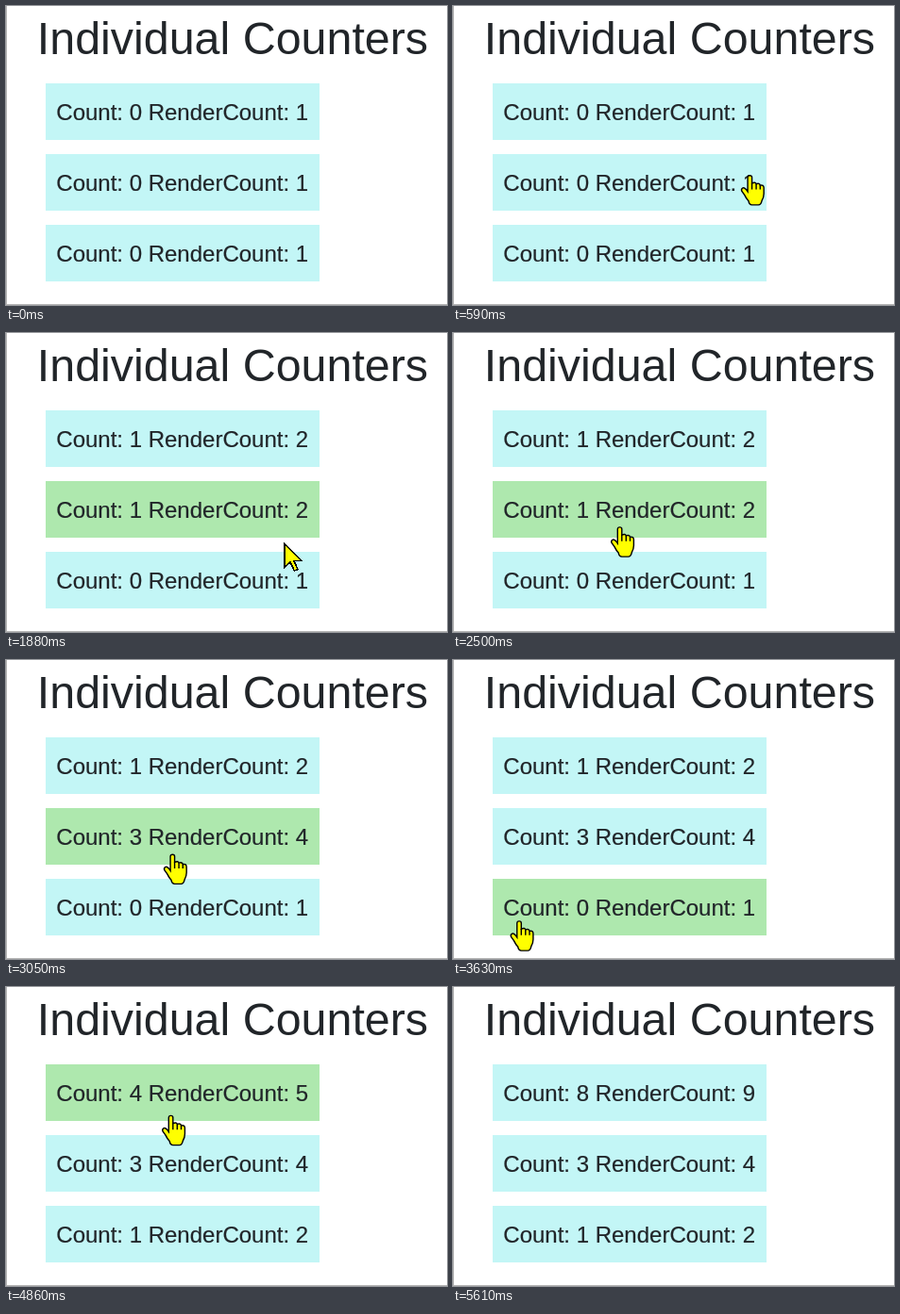
These frames come from a looping animation (467x317 px, 6.24 s). An HTML page:

```html
<!DOCTYPE html>
<html lang="en">
<head>
<meta charset="utf-8">
<title>Individual Counters</title>
<style>
  html, body { margin: 0; width: 100%; height: 100%; overflow: hidden; background: #fff; }
  svg { display: block; width: 467px; height: 317px; }
  text { font-family: "Liberation Sans", Arial, sans-serif; font-kerning: none; fill: #212529; }
  .title { font-size: 48.4px; }
  .card text { font-size: 24px; stroke: #212529; stroke-width: 0.2px; }
  .card rect { fill: #c3f6f6; }
  .card.hover rect { fill: #aee8ae; }
  .edge { fill: #b4b4b4; }
  #cursor { fill: #ff0; stroke: #000; stroke-linejoin: miter; }
  #cursor.pressed { fill: url(#press); }
  #arrow { shape-rendering: crispEdges; }
</style>
</head>
<body>
<svg viewBox="0 0 467 317">
  <defs>
    <linearGradient id="press" x1="0" y1="0" x2="1" y2="0.6">
      <stop offset="0.1" stop-color="#efe414"/>
      <stop offset="0.8" stop-color="#b8ab14"/>
    </linearGradient>
  </defs>
  <rect class="edge" width="1" height="317"/>
  <rect class="edge" y="316" width="467" height="1"/>
  <text class="title" x="32.8" y="51">Individual Counters</text>
  <g id="cards"></g>
  <g id="cursor">
    <path id="arrow" transform="translate(-.5 -1) scale(1.57)" stroke-width="1"
      d="M.5 .8V16.2L4.2 12.8L6.9 18.6L9.2 17.6L6.6 11.9H11.6Z"/>
    <g id="hand" transform="translate(-10.2 -.5) scale(1.5)" stroke-width=".95">
      <path d="M5 12V2Q5 .6 6.5 .6T8 2V6Q10.6 5 11 6.6Q13.4 5.8 13.8 7.6Q16.4 7 16.4 9.4V13.5
        Q16.4 16 15 18.4Q14.4 21.4 12.5 21.4H8Q6 21.4 5.6 18.6Q4 17 2.8 14.4L.8 11.6Q.2 10 1.6 9.4Q3 9 5 12Z"/>
      <path fill="none" d="M8 6V10.5M11 6.6V10.5M13.8 7.6V10.5"/>
    </g>
  </g>
</svg>
<script>
const LOOP = 6240, STEP = 1000 / 15, PHASE = 13;
const BOX = { x: 42, y: 82, w: 290, h: 60, pitch: 75 };
const HOVER_LAG = 70, CLICK_GAP = 140, PRESS = 80;

// Pointer stops; it eases from one to the next
const STOPS = [
  { x: 425, y: 325, arrive: 0, leave: 240 },
  { x: 276, y: 128, arrive: 700, leave: 1100 },
  { x: 294, y: 188, arrive: 1390, leave: 1740 },
  { x: 296, y: 260, arrive: 2020, leave: 2020 },
  { x: 182, y: 262, arrive: 2200, leave: 2200 },
  { x: 177, y: 205.5, arrive: 2440, leave: 3000 },
  { x: 135, y: 258, arrive: 3300, leave: 3300 },
  { x: 70.5, y: 276.5, arrive: 3600, leave: 3850 },
  { x: 368, y: 185, arrive: 4130, leave: 4130 },
  { x: 175, y: 136, arrive: 4440, leave: 5320 },
  { x: 500, y: 340, arrive: 5540, leave: LOOP }
];

const BURSTS = [
  { card: 0, from: 1140, clicks: 1 },
  { card: 1, from: 1680, clicks: 1 },
  { card: 1, from: 2640, clicks: 2 },
  { card: 2, from: 3770, clicks: 1 },
  { card: 0, from: 4450, clicks: 7 }
];

const $ = id => document.getElementById(id);
const ease = k => k * k * (3 - 2 * k);
const clamp = (v, lo, hi) => Math.min(hi, Math.max(lo, v));

function add(parent, tag, attrs) {
  const el = document.createElementNS("http://www.w3.org/2000/svg", tag);
  for (const key in attrs) el.setAttribute(key, attrs[key]);
  return parent.appendChild(el);
}

const cards = [0, 1, 2].map(i => {
  const y = BOX.y + i * BOX.pitch;
  const group = add($("cards"), "g", { class: "card" });
  add(group, "rect", { x: BOX.x, y, width: BOX.w, height: BOX.h });
  return { group, label: add(group, "text", { x: 53.3, y: y + 39 }) };
});

function pointAt(t) {
  const i = Math.max(0, STOPS.findLastIndex(s => s.arrive <= t));
  const a = STOPS[i], b = STOPS[i + 1];
  if (t <= a.leave) return a;
  const k = ease((t - a.leave) / (b.arrive - a.leave));
  return { x: a.x + (b.x - a.x) * k, y: a.y + (b.y - a.y) * k };
}

function cardAt({ x, y }) {
  if (x < BOX.x || x > BOX.x + BOX.w) return -1;
  return cards.findIndex((_, i) => {
    const dy = y - BOX.y - i * BOX.pitch;
    return dy >= 0 && dy < BOX.h;
  });
}

function clicksDone({ from, clicks }, t) {
  return clamp(Math.floor((t - from) / CLICK_GAP) + 1, 0, clicks);
}

function isPressed(burst, t) {
  const done = clicksDone(burst, t);
  return done > 0 && t - burst.from - (done - 1) * CLICK_GAP < PRESS;
}

function render(t) {
  const hovered = cardAt(pointAt(t - HOVER_LAG));
  cards.forEach(({ group, label }, i) => {
    const count = BURSTS.filter(b => b.card === i)
      .reduce((sum, b) => sum + clicksDone(b, t), 0);
    label.textContent = `Count: ${count} RenderCount: ${count + 1}`;
    group.classList.toggle("hover", i === hovered);
  });

  const point = pointAt(t);
  const onCard = cardAt(point) >= 0;
  $("hand").style.display = onCard ? "" : "none";
  $("arrow").style.display = onCard ? "none" : "";
  $("cursor").classList.toggle("pressed", BURSTS.some(b => isPressed(b, t)));
  $("cursor").setAttribute("transform", `translate(${point.x} ${point.y})`);
}

const start = performance.now();
function frame() {
  const t = (performance.now() - start) % LOOP;
  // The screen updates 15 times a second
  render(Math.floor((t - PHASE) / STEP) * STEP + PHASE);
  requestAnimationFrame(frame);
}
frame();
</script>
</body>
</html>
```
